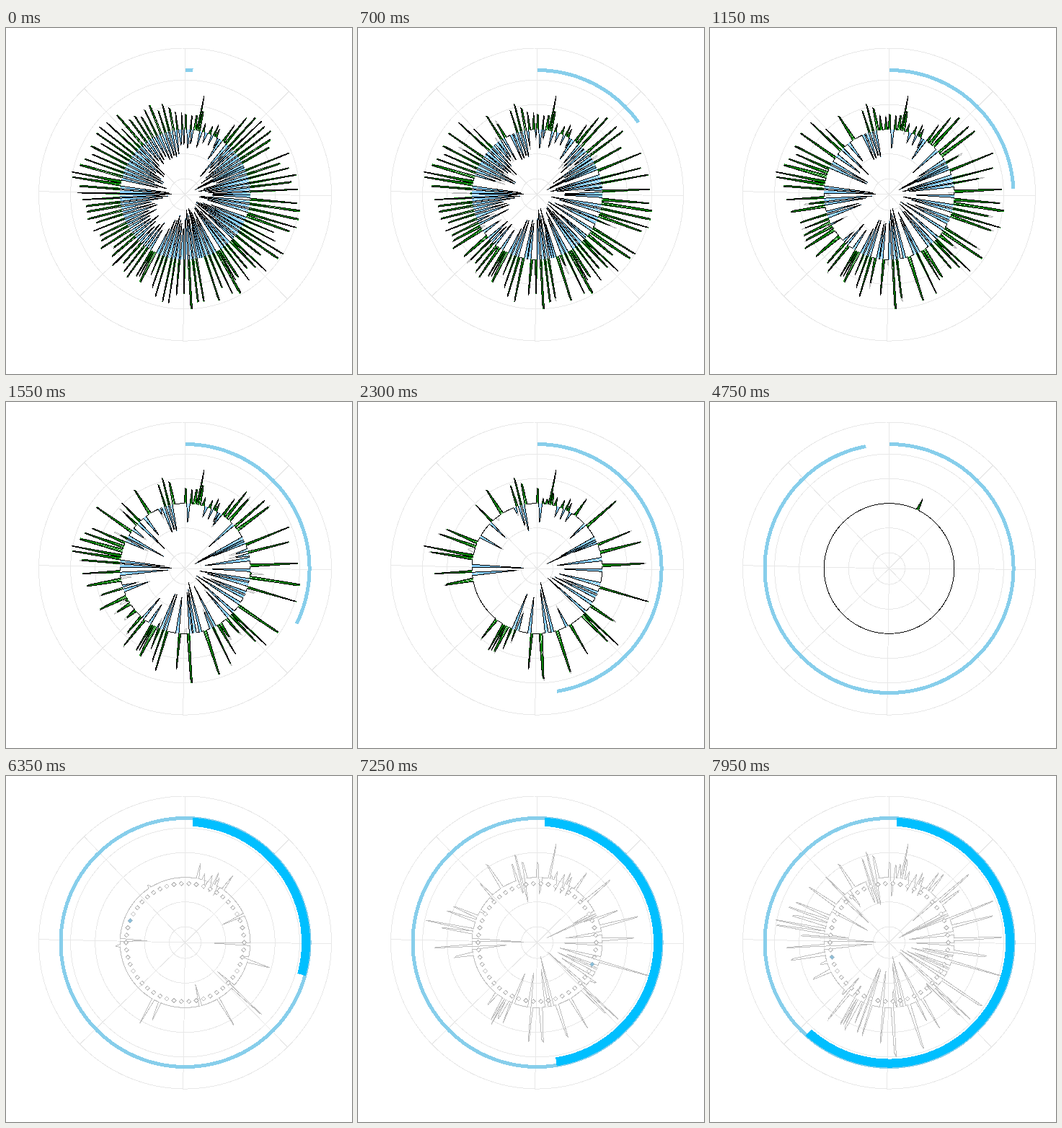
An HTML page for the animation above (8 s loop, 480 by 480 pixels).

```html
<!DOCTYPE html>
<html lang="en">
<head>
<meta charset="utf-8">
<title>Radial threshold</title>
<style>
  html, body { margin: 0; width: 100%; height: 100%; overflow: hidden; background: #fff; }
  svg { display: block; width: 100vw; height: 100vh; }
  path { fill: none; stroke-width: 1; shape-rendering: crispEdges; }
</style>
</head>
<body>
<svg id="stage" viewBox="0 0 480 480"></svg>
<script>
const CX = 248.5, CY = 231, BASE = 90.3, FOOT = 1.1;
const STEP_MS = 50, STEPS = 160, TURN = 99, SWEEP = 360 / TURN;
const stage = document.getElementById('stage');

function addPath(stroke, width = 1, fill = 'none') {
  const el = document.createElementNS('http://www.w3.org/2000/svg', 'path');
  el.style.cssText = `stroke:${stroke};stroke-width:${width};fill:${fill}`;
  stage.append(el);
  return el;
}
const draw = (el, d) => el.setAttribute('d', d);

// Angles run clockwise from the top, in degrees.
function polar(angle, r) {
  const a = angle * Math.PI / 180;
  return (CX + r * Math.sin(a)).toFixed(1) + ' ' + (CY - r * Math.cos(a)).toFixed(1);
}
const line = points => points.length ? 'M' + points.join('L') : '';
function arc(from, to, r) {
  const points = [];
  for (let a = from; a < to; a += 1) points.push(polar(a, r));
  if (to > from) points.push(polar(to, r));
  return line(points);
}

let seed = 41;
function random() {
  seed = (seed * 16807) % 2147483647;
  return seed / 2147483647;
}

// Smooth envelope of the tips: short at the top, lower left and upper left
function bump(angle, centre, spread) {
  const d = (angle - centre + 540) % 360 - 180;
  return Math.exp(-((d / spread) ** 2));
}
const outer = a => 162 - 44 * bump(a, 5, 20) - 20 * bump(a, 232, 25) - 18 * bump(a, 328, 22);
const inner = a => 18 + 48 * bump(a, 10, 24) + 30 * bump(a, 225, 25) + 24 * bump(a, 328, 22);

// Strongest spikes: angle, tip radius, step at which each is gone
const spikes = [
  [11, 138, 74], [25.8, 107, 200], [35.5, 118, 86], [64.6, 15, 74], [91.5, 38, 92],
  [106.6, 161, 74], [132, 20, 74], [133.4, 155, 86], [149.5, 137, 90], [166.3, 20, 74],
  [203, 120, 88], [209.3, 130, 92], [272.4, 18, 76], [281.3, 161, 67.5]
].map(([angle, tip, life]) => ({ angle, tip, life, half: 0.1 }));

// Small lasting ripple at the upper right
for (let i = 0; i < 6; i++) {
  spikes.push({ angle: 16 + 3 * i, tip: i % 2 ? 76 : 102, life: 82 + 2 * i, half: 0.1 });
}

const SLOTS = 96, strong = spikes.slice();
for (let i = 0; i < SLOTS * 2; i++) {
  const angle = (i + 0.3 + 0.4 * random()) * 180 / SLOTS;
  const limit = i % 2 ? inner(angle) : outer(angle);
  const tip = BASE + (limit - BASE) * (0.6 + 0.4 * random());
  const life = 10 + 60 * random() ** 1.4;
  const half = 0.1 + 0.4 * random();
  if (strong.every(s => Math.abs(s.angle - angle) > 1.2)) spikes.push({ angle, tip, life, half });
}
spikes.sort((a, b) => a.angle - b.angle);

function liveSpikes(level) {
  return spikes.filter(s => s.life > level).map(s => {
    const scale = Math.min(1, ((s.life - level) / (s.life * 0.27)) ** 0.6);
    return { ...s, r: BASE + (s.tip - BASE) * scale };
  });
}

function outline(live) {
  const points = [];
  live.forEach((s, i) => {
    const wrap = i === live.length - 1;
    const next = live[wrap ? 0 : i + 1];
    const from = s.angle + s.half;
    const to = next.angle - next.half + (wrap ? 360 : 0);
    points.push(polar(s.angle - s.half, s.r), polar(from, s.r + (BASE - s.r) * s.half * 0.2));
    if (to - from > 2 * FOOT) {
      for (let a = from + FOOT; a < to - FOOT; a += 1.5) points.push(polar(a, BASE));
      points.push(polar(to - FOOT, BASE));
    } else if ((s.r > BASE) === (next.r > BASE)) {
      points.push(polar((from + to) / 2, BASE));
    }
  });
  return line(points) + 'Z';
}

function hatch(live, outward) {
  const stroke = (s, k) =>
    line([polar(s.angle + k * (FOOT + s.half), BASE), polar(s.angle + k * s.half, s.r)]);
  return live.filter(s => (s.r > BASE) === outward)
    .map(s => [-0.6, 0, 0.6].map(k => stroke(s, k)).join('')).join('');
}

function diamond(k) {
  const [x, y] = polar(3.6 + 7.2 * k, 82).split(' ');
  return `M${x} ${y}m-3 0l3 -3l3 3l-3 3z`;
}

const grid = addPath('#e8e8e8');
const trail = addPath('#bebebe');
const green = addPath('#008000');
const blue = addPath('#87cefa');
const curve = addPath('#000');
const markers = addPath('#bebebe', 1, '#fff');
const marker = addPath('#a0bccb', 1, '#87bedb');
const thinArc = addPath('#87ceeb', 5);
const wideArc = addPath('#00bfff', 12);

let rings = arc(0, 360, 22) + arc(0, 360, 203);
for (let i = 0; i < 4; i++) rings += arc(0, 360, 56.3 + 34.2 * i);
let spokes = '';
for (let i = 0; i < 8; i++) spokes += line([polar(0, 0), polar(i * 45.2, 203)]);
draw(grid, rings + spokes);

function render(n) {
  const back = n >= TURN;
  const level = back ? 196 - n : n;
  const live = liveSpikes(level);
  draw(curve, outline(live));
  curve.style.stroke = back ? '#bebebe' : '#000';
  draw(trail, back || n === 0 ? '' : outline(liveSpikes(level - 1)));
  draw(green, back ? '' : hatch(live, true));
  draw(blue, back ? '' : hatch(live, false));
  draw(thinArc, arc(0, Math.min(360, (n + 1) * SWEEP), 172.5));
  draw(wideArc, back ? arc(SWEEP, (n - 98) * SWEEP, 167.5) : '');
  draw(markers, back ? Array.from({ length: 50 }, (_, k) => diamond(k)).join('') : '');
  draw(marker, back ? diamond(Math.round(1.42 * (n - TURN)) % 50) : '');
}

const start = performance.now();
let shown = -1;
function tick() {
  const n = Math.floor((performance.now() - start) / STEP_MS) % STEPS;
  if (n !== shown) render(shown = n);
  requestAnimationFrame(tick);
}
tick();
</script>
</body>
</html>
```
